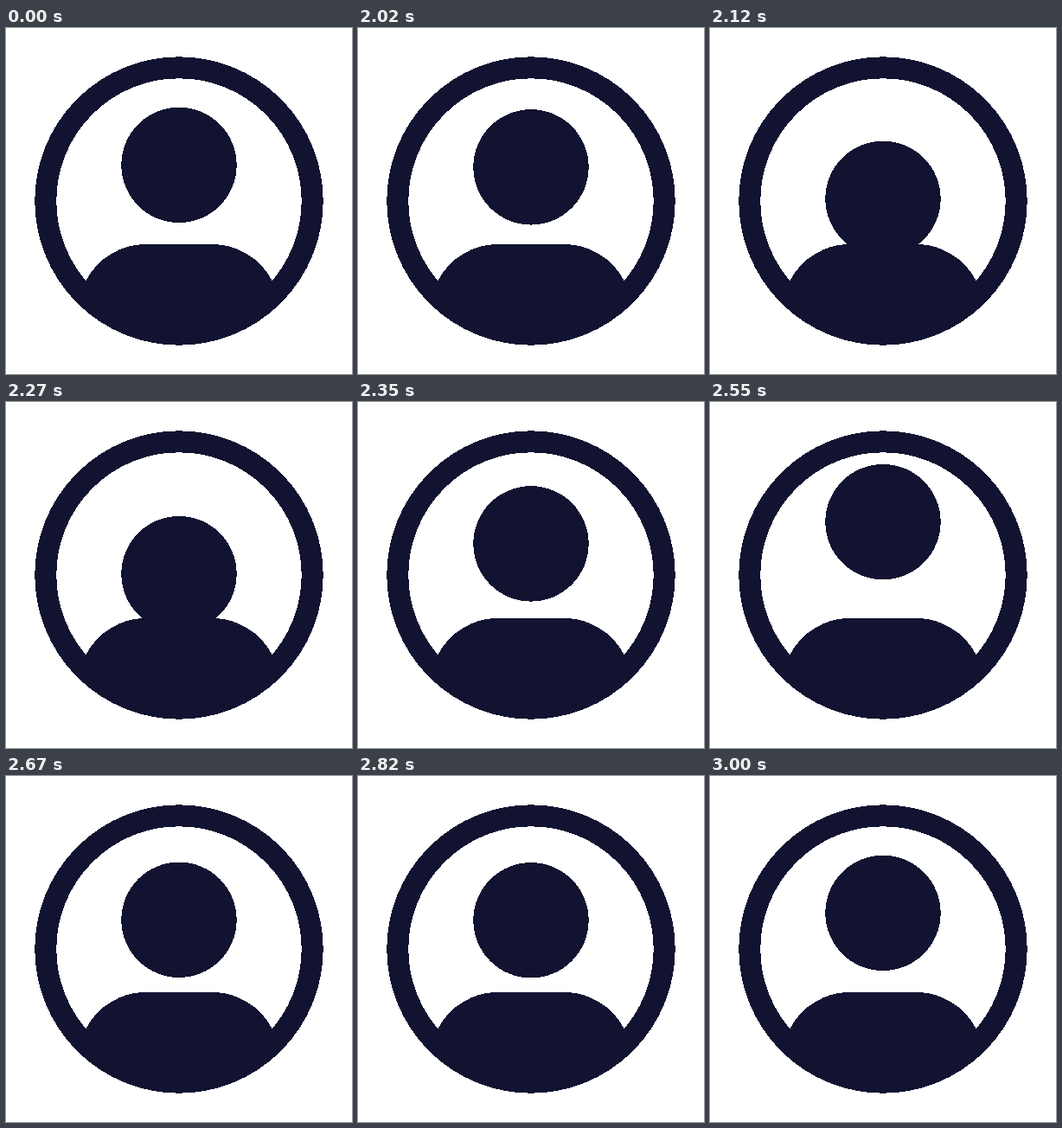
An HTML page for the animation above (3020 ms loop, 400 px wide and 400 px high).

```html
<!DOCTYPE html>
<html lang="en">
<head>
<meta charset="utf-8">
<title>Bobbing avatar</title>
<style>
  html, body { margin: 0; width: 100%; height: 100%; overflow: hidden; background: #fff; }
  svg { display: block; width: 100%; height: 100%; }
</style>
</head>
<body>
<svg viewBox="0 0 400 400" fill="#121331" shape-rendering="crispEdges">
  <circle cx="200" cy="200" r="154.2" fill="none" stroke="#121331" stroke-width="25"/>
  <path d="M92.4 292.3A78 78 0 0 1 162 250H238A78 78 0 0 1 307.6 292.3L316 310A160 160 0 0 1 84 310Z"/>
  <circle id="head" cx="200" cy="158.4" r="66.7"/>
</svg>
<script>
  const LOOP = 3020, STEP = 25, REST_Y = 158.4;
  // [time in ms, vertical offset of the head]
  const KEYS = [[2000, 0], [2200, 57], [2467, -30], [2725, 12], [3000, 0]];
  const head = document.getElementById('head');

  const ease = p => p * p * (3 - 2 * p);

  function offsetAt(t) {
    for (let i = 1; i < KEYS.length; i++) {
      const [t0, y0] = KEYS[i - 1], [t1, y1] = KEYS[i];
      if (t >= t0 && t < t1) return y0 + (y1 - y0) * ease((t - t0) / (t1 - t0));
    }
    return 0;
  }

  function render(ms) {
    // Poses advance at 40 per second; display times fall on 10 ms ticks.
    const t = Math.floor((ms % LOOP + 5) / STEP) * STEP;
    head.setAttribute('cy', (REST_Y + offsetAt(t)).toFixed(2));
  }

  const start = performance.now();
  function tick() {
    render(performance.now() - start);
    requestAnimationFrame(tick);
  }
  tick();
</script>
</body>
</html>
```
